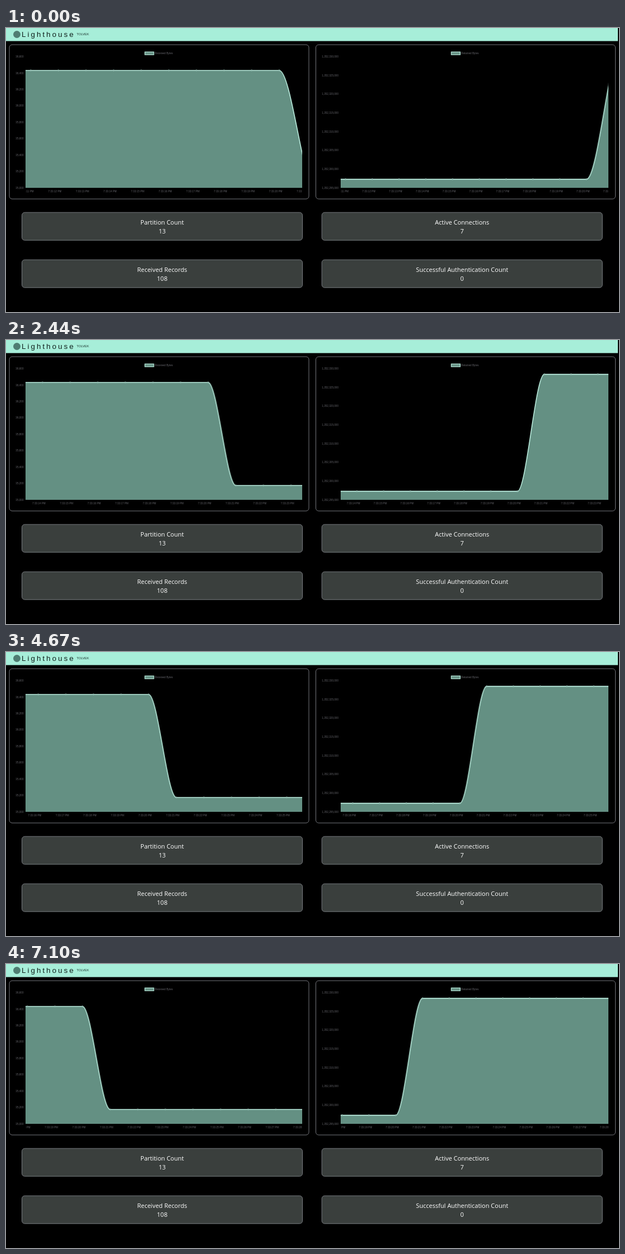
Animation of 1099 by 510 pixels, one loop 7.15 s. Source, as an HTML page:

```html
<!DOCTYPE html>
<html lang="en">
<head>
<meta charset="utf-8">
<title>Lighthouse</title>
<style>
  html, body { margin: 0; width: 100%; height: 100%; overflow: hidden; background: #000; }
  svg { display: block; width: 1099px; height: 510px; }
  text { font-family: "Liberation Sans", Arial, sans-serif; }
  .small { font-size: 4.65px; fill: #64646a; }
  .end { text-anchor: end; }
  .mid { text-anchor: middle; }
  .card { font: 11px "Open Sans", "Noto Sans", sans-serif; fill: #fff; text-anchor: middle; }
  .frame { fill: none; stroke: #74767c; }
  .box { fill: #3a3f3d; stroke: #787b80; }
  .area { fill: #649083; }
  .line { fill: none; stroke: #bdf0e1; stroke-width: 1.6; }
  .dot { fill: #7ea69b; stroke: #b4e3d6; stroke-width: .5; }

  .slide, .early, .late { animation: 7150ms -4ms infinite; }
  .slide { animation-name: slide; }
  .early { animation-name: early; animation-timing-function: step-end; }
  .late { animation-name: late; animation-timing-function: step-end; }

  /* Positions are in seconds along the time axis; --d is pixels per second. */
  @keyframes slide {
    0% { transform: translateX(calc(var(--d) * 9.18)); animation-timing-function: steps(18); }
    12.727% { transform: translateX(calc(var(--d) * 8.143)); animation-timing-function: steps(30); }
    34.126% { transform: translateX(calc(var(--d) * 6.605)); animation-timing-function: steps(26); }
    52.587% { transform: translateX(calc(var(--d) * 5.355)); animation-timing-function: steps(18); }
    65.315% { transform: translateX(calc(var(--d) * 4.45)); animation-timing-function: steps(33); }
    88.671% { transform: translateX(calc(var(--d) * 2.825)); animation-timing-function: steps(15); }
    99.301%, 100% { transform: translateX(calc(var(--d) * 2.055)); }
  }
  /* The curve flattens once the next sample arrives. */
  @keyframes early { 0% { opacity: 1; } 2.1%, 100% { opacity: 0; } }
  @keyframes late { 0% { opacity: 0; } 2.1%, 100% { opacity: 1; } }
</style>
</head>
<body>
<svg id="stage" viewBox="0 0 1099 510">
  <rect width="1097" height="23.5" fill="#a7eed9"/>
  <circle cx="19.5" cy="11.5" r="6.5" fill="#4f7d72"/>
  <text x="28" y="16" font-size="13.5" letter-spacing="3" fill="#10201c">Lighthouse</text>
  <text x="126.5" y="13.2" font-size="5.8" fill="#1c332d">TOLVEK</text>
</svg>
<script>
  const stage = document.getElementById('stage');
  const BASE = 287, TOP = 51.5;

  function add(parent, tag, attrs, text) {
    const el = document.createElementNS('http://www.w3.org/2000/svg', tag);
    for (const key in attrs) el.setAttribute(key, attrs[key]);
    if (text !== undefined) el.textContent = text;
    parent.appendChild(el);
    return el;
  }

  function curve(parent, cls, d, y1, y2, bend) {
    const g = add(parent, 'g', { class: cls });
    const path = `M${-12 * d} ${y1}H0C${d / 3} ${y1} ${2 * d / 3} ${bend} ${d} ${y2}H${11 * d}`;
    add(g, 'path', { class: 'area', d: `${path}V${BASE}H${-12 * d}Z` });
    add(g, 'path', { class: 'line', d: path });
  }

  function chart(c) {
    const d = c.step;
    add(stage, 'rect', { class: 'frame', x: c.box, y: 30, width: 537, height: 277, rx: 5 });

    add(stage, 'rect', { class: 'area', x: c.key + .5, y: 43, width: 16, height: 5,
      style: 'stroke:#bdf0e1;stroke-width:1.2' });
    add(stage, 'text', { class: 'small', x: c.key + 18.3, y: 47 }, c.title);

    for (let i = 0; i < c.ticks; i++) {
      const y = TOP + (BASE - TOP) * i / (c.ticks - 1);
      add(stage, 'text', { class: 'small end', x: c.x - 4, y: y + 1.6 },
        (c.max - i * c.unit).toLocaleString('en-US'));
    }

    const clip = add(stage, 'clipPath', { id: c.id });
    add(clip, 'rect', { x: c.x, y: 32, width: c.w, height: 272 });
    const view = add(stage, 'g', { 'clip-path': `url(#${c.id})` });
    const origin = add(view, 'g', { transform: `translate(${c.x} 0)` });
    const g = add(origin, 'g', { class: 'slide', style: `--d:${d}px` });

    curve(g, 'early', d, c.y1, c.y2, c.y2 - (c.y2 - c.y1) / 3);
    curve(g, 'late', d, c.y1, c.y2, c.y2);
    for (let i = -11; i < 10; i++) {
      add(g, 'circle', { class: 'dot', cx: i * d, cy: i > 0 ? c.y2 : c.y1, r: 1.2 });
      add(g, 'text', { class: 'small mid', x: (i - .13) * d, y: 295.2 },
        `7:33:${String(20 + i).padStart(2, '0')} PM`);
    }
  }

  function card(x, y, label, value) {
    add(stage, 'rect', { class: 'box', x, y, width: 503, height: 50, rx: 5 });
    add(stage, 'text', { class: 'card', x: x + 251.5, y: y + 21.8 }, label);
    add(stage, 'text', { class: 'card', x: x + 251.5, y: y + 37.3 }, value);
  }

  chart({ id: 'received', title: 'Received Bytes', box: 6, key: 248.5, x: 35.5, w: 495.5,
    step: 49.5, y1: 76.2, y2: 261.2, max: 36600, unit: 200, ticks: 9 });
  chart({ id: 'retained', title: 'Retained Bytes', box: 555.5, key: 797.8, x: 600, w: 480,
    step: 48, y1: 271.6, y2: 61.6, max: 1352330000, unit: 5000, ticks: 8 });

  card(28.5, 331.2, 'Partition Count', 13);
  card(566.2, 331.2, 'Active Connections', 7);
  card(28.5, 416.2, 'Received Records', 108);
  card(566.2, 416.2, 'Successful Authentication Count', 0);
</script>
</body>
</html>
```
